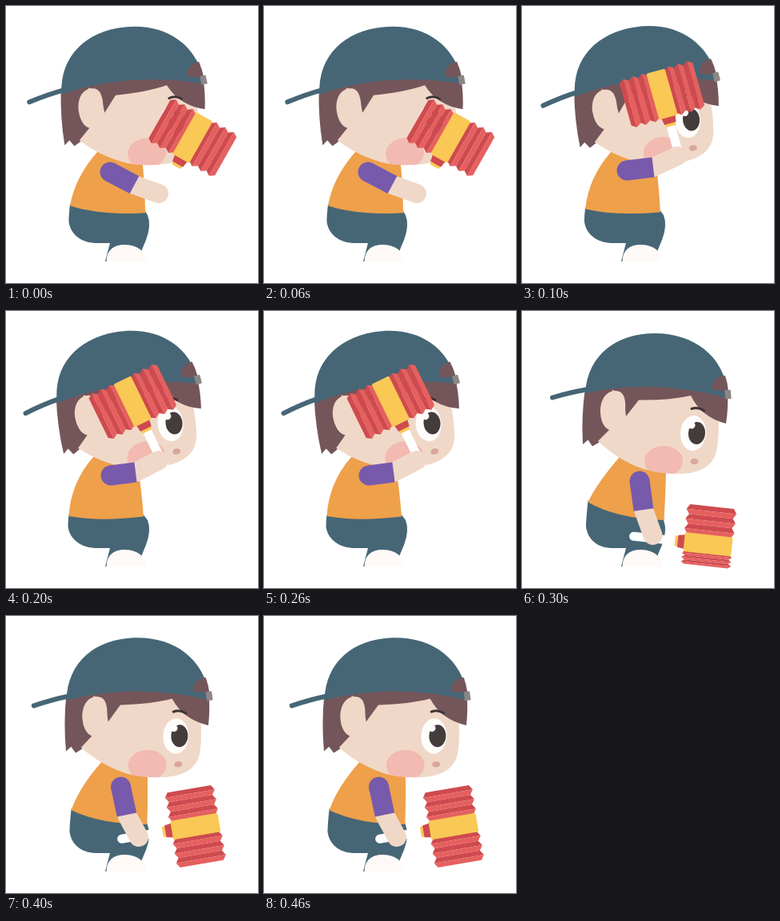
Write an HTML page with a canvas that moves like this. It is 315x347 px and loops after 0.5 s.

```html
<!DOCTYPE html>
<html lang="en">
<head>
<meta charset="utf-8">
<title>Toy hammer</title>
<style>
html, body { margin: 0; width: 100%; height: 100%; overflow: hidden; background: #fff; }
canvas { display: block; }
</style>
</head>
<body>
<canvas id="stage" width="315" height="347"></canvas>
<script>
const ctx = document.getElementById('stage').getContext('2d');
const STEP = 100;
const TEAL = '#466676', HAIR = '#74565a', SKIN = '#f0d8c8', ORANGE = '#eea04a',
  PURPLE = '#775aab', YELLOW = '#fac855', RED = '#e5605f', DARK_RED = '#ce4a4e', WHITE = '#fffdfc';
const MAX_TILT = 0.175;

// tilt: head angle; hammer: centre x, y, handle angle, squash of the striking side;
// arm: shoulder, elbow, hand
const poses = [
  { tilt: 0.108, hammer: [233.3, 165, 119.5, 1], arm: [130, 208, 160.5, 224, 191, 235] },
  { tilt: 0.147, hammer: [175, 110.5, 74.3, 1], arm: [131, 206, 164, 202, 194, 188] },
  { tilt: 0.175, hammer: [158.3, 113.5, 64, 1], arm: [131, 206, 162, 202, 191, 187] },
  { tilt: 0, hammer: [232.5, 292.3, 186.2, 0.45], arm: [147, 213, 152, 249, 163.5, 281] },
  { tilt: 0.037, hammer: [236.8, 263.5, 170.3, 1], arm: [143.5, 214, 151, 249, 166, 277] }
];

const shape = {
  face: new Path2D('M113 98L113 145L95 163Q120 187 152 198Q172 204 198 204Q235 203 242.5 178Q246 163 246 137L246 98Z'),
  backHair: new Path2D('M79 96Q74 132 76 167L82.5 161.5L88 169.5Q104 161 113 149L138 98Z'),
  bangs: new Path2D('M108 96L127 106L130 132L146 111.5Q185 112 211 106Q224 133 255 141Q258 122 257 102L180 88Z'),
  ear: new Path2D('M117 100C104 100 97.5 113 98 127C98.5 140 104 149 113 150L126 150Q128 140 129 125Q131 100 117 100Z'),
  cap: new Path2D('M79 103C82 55 118 28 166 28C215 28 252 56 258 104L256 109Q165 84 79 103Z'),
  capHole: new Path2D('M237 98Q238 83 254 81Q257 90 258 101Z')
};

function fill(path, color) {
  ctx.fillStyle = color;
  ctx.fill(path);
}

function oval(x, y, rx, ry, color, angle = 0) {
  const path = new Path2D();
  path.ellipse(x, y, rx, ry, angle, 0, Math.PI * 2);
  fill(path, color);
}

function polygon(points, color) {
  const path = new Path2D();
  points.forEach(([x, y]) => path.lineTo(x, y));
  path.closePath();
  fill(path, color);
}

function stroke(d, width, color, cap = 'round') {
  ctx.lineWidth = width;
  ctx.lineCap = cap;
  ctx.lineJoin = 'round';
  ctx.strokeStyle = color;
  ctx.stroke(new Path2D(d));
}

function drawBody(lean) {
  const neckX = 109 + 13 * lean, shoulderX = 165 + 15 * lean;
  const leftX = 78.5 + 4 * lean, leftY = 257 - 17.5 * lean;
  const rightX = 172 + 5.5 * lean, rightY = 257.5 + 4.5 * lean;
  const hipX = 77.5 + 2.5 * lean;
  fill(new Path2D(`M${leftX} ${leftY - 2}Q${hipX} 262 ${hipX} 270C${hipX + 2} 286 94 296.5 112 297
    L130 297L124 320L165 320Q169 306 175 293Q182 275 177 262L${rightX} ${rightY - 2}Z`), TEAL);
  fill(new Path2D('M125.5 320Q126 299 149 299Q173 300 175 320Z'), '#fffaf8');
  fill(new Path2D(`M${neckX} 183Q${neckX - 28} 215 ${leftX} ${leftY}Q118 ${264 - 4 * lean} ${rightX} ${rightY}
    Q${(rightX + shoulderX) / 2 + 1} 225 ${shoulderX} 196L150 180Z`), ORANGE);
}

function drawHead(tilt) {
  ctx.save();
  ctx.translate(143, 195);
  ctx.rotate(-tilt);
  ctx.translate(-143, -195);
  fill(shape.backHair, HAIR);
  fill(shape.face, SKIN);
  ctx.save();
  ctx.clip(shape.face);
  oval(177, 188, 24, 19, '#f2bab1');
  ctx.restore();
  oval(214, 153, 16, 22, WHITE, 0.08);
  oval(218.5, 153, 10.5, 14, '#433c3a', 0.08);
  oval(212, 143, 4.5, 4.5, WHITE);
  oval(215.5, 188.5, 5, 3.7, '#d9a69b');
  fill(shape.bangs, HAIR);
  stroke('M212 122.5Q220 119.5 227.5 125', 3, '#3f3335');
  fill(shape.ear, SKIN);
  stroke('M38 108.5Q61 101.5 83 98', 6, TEAL);
  fill(shape.cap, TEAL);
  fill(shape.capHole, HAIR);
  stroke('M257 99L258 110', 7.5, '#8b8785', 'butt');
  ctx.restore();
}

function drawBellows(start, end) {
  const folds = 6;
  const at = i => start + (end - start) * i / folds;
  const half = i => i % 2 ? 31.5 : 27.5;
  for (let i = 0; i < folds; i++) {
    const a = half(i), b = half(i + 1), y1 = at(i), y2 = at(i + 1);
    polygon([[-a, y1], [a, y1], [b, y2], [-b, y2]], i % 2 ? RED : DARK_RED);
  }
}

function drawHammer([x, y, degrees, squash]) {
  ctx.save();
  ctx.translate(x, y);
  ctx.rotate(degrees * Math.PI / 180);
  stroke('M42 0L93.5 0', 11, '#fff');
  stroke('M36 0L41.5 0', 13, YELLOW, 'butt');
  polygon([[29, -9], [38, -7.5], [38, 7.5], [29, 9]], DARK_RED);
  drawBellows(47.5, 11);
  drawBellows(-11, -11 - 36.5 * squash);
  ctx.fillStyle = YELLOW;
  ctx.beginPath();
  ctx.roundRect(-30, -12, 60, 24, 2);
  ctx.fill();
  ctx.restore();
}

function drawArm([shoulderX, shoulderY, elbowX, elbowY, handX, handY]) {
  const sleeve = `M${shoulderX} ${shoulderY}L${elbowX} ${elbowY}`;
  stroke(`${sleeve}L${handX} ${handY}`, 24, SKIN);
  stroke(sleeve, 25, PURPLE, 'butt');
  oval(shoulderX, shoulderY, 12.5, 12.5, PURPLE);
}

function draw(now) {
  const { tilt, hammer, arm } = poses[Math.floor(now / STEP) % poses.length];
  ctx.fillStyle = '#fff';
  ctx.fillRect(0, 0, 315, 347);
  drawBody(1 - tilt / MAX_TILT);
  drawHead(tilt);
  drawHammer(hammer);
  drawArm(arm);
}

const started = performance.now();
function tick() {
  draw(performance.now() - started);
  requestAnimationFrame(tick);
}
tick();
</script>
</body>
</html>
```
